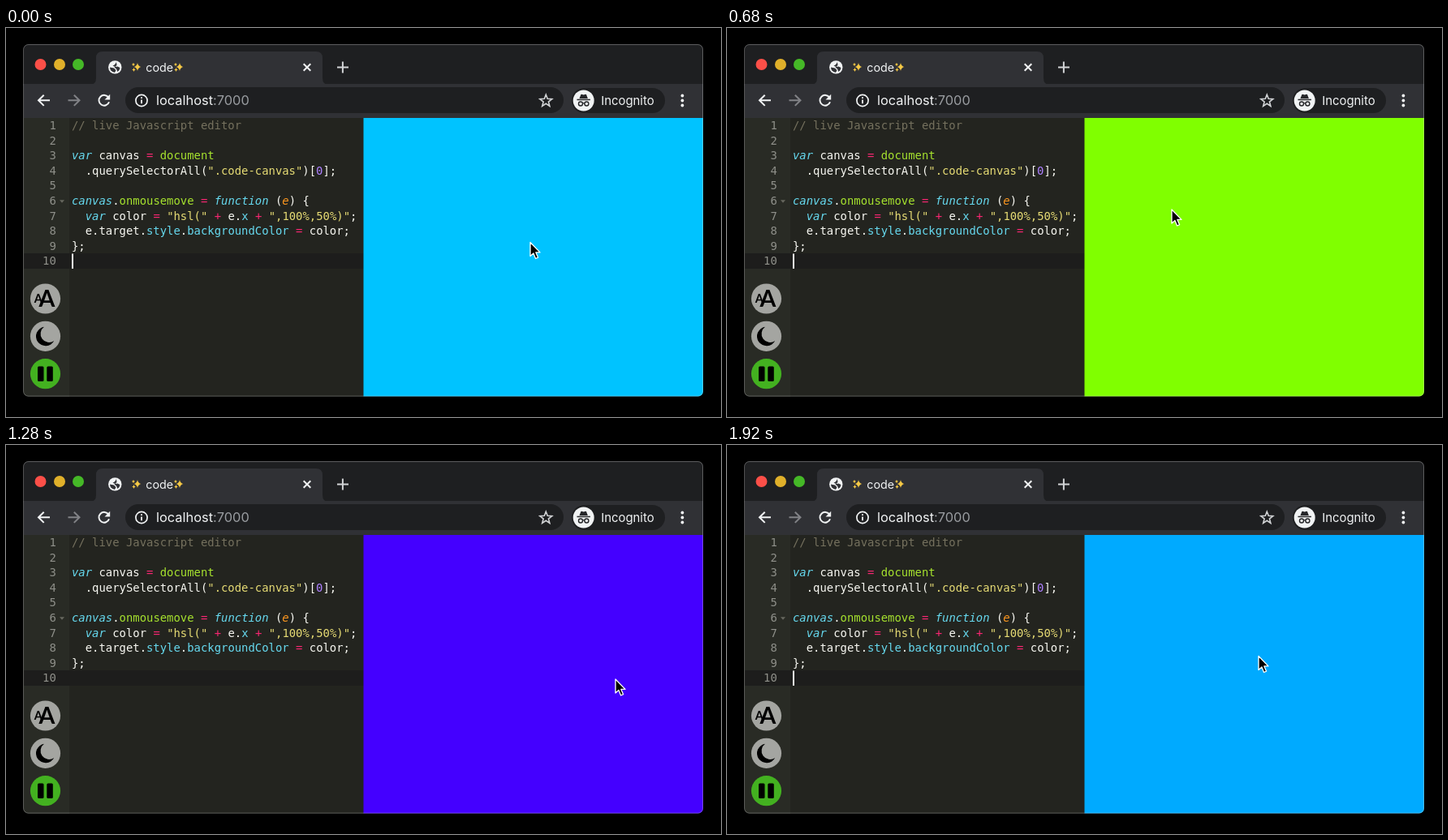
An HTML page for the animation above (1.96 s loop, 881 by 480 pixels).

```html
<!DOCTYPE html>
<html lang="en">
<head>
<meta charset="utf-8">
<title>Live editor</title>
<style>
  html, body { margin: 0; width: 100%; height: 100%; overflow: hidden; background: #000; }
  svg { display: block; position: absolute; left: 0; top: 0; }
  text { white-space: pre; }
  .ui { font-family: Inter, "Open Sans", sans-serif; fill: #f1f3f4; }
  .code { font: 13.9px "DejaVu Sans Mono", "Liberation Mono", monospace; fill: #f8f8f2; }
  .line { fill: none; stroke: #f1f3f4; stroke-width: 2; }
  .num { fill: #8f908a; text-anchor: end; }
  .c { fill: #75715e; }
  .k { fill: #66d9ef; font-style: italic; }
  .p { fill: #66d9ef; }
  .o { fill: #f92672; }
  .g { fill: #a6e22e; }
  .s { fill: #e6db74; }
  .n { fill: #ae81ff; }
  .a { fill: #fd971f; font-style: italic; }
</style>
</head>
<body>
<svg width="881" height="480" viewBox="0 0 881 480">
  <defs>
    <clipPath id="win"><rect x="21.5" y="20" width="837.5" height="434.5" rx="6"/></clipPath>
    <path id="spark" d="M0-5Q.8-.8 4.5 0Q.8.8 0 5Q-.8.8-4.5 0Q-.8-.8 0-5Z"/>
    <g id="sparkles" fill="#f6c945">
      <use href="#spark" x="1.5" y="0"/>
      <use href="#spark" transform="translate(-3.5 -3) scale(.45)"/>
      <use href="#spark" transform="translate(-3 3.5) scale(.5)"/>
    </g>
  </defs>

  <g clip-path="url(#win)">
    <rect x="21" y="20" width="839" height="51" fill="#1e1f21"/>
    <path d="M103 70Q111 70 111 62V37Q111 29 119 29H382Q390 29 390 37V62Q390 70 398 70Z" fill="#303135"/>
    <rect x="21" y="69" width="839" height="42" fill="#303135"/>
    <rect x="147" y="73" width="540" height="32" rx="16" fill="#1e1f21"/>
    <rect x="697" y="74" width="115" height="31" rx="15.5" fill="#1e1f21"/>

    <circle cx="42.5" cy="45" r="7" fill="#fc4f48"/>
    <circle cx="66" cy="45" r="7" fill="#e0b02a"/>
    <circle cx="89" cy="45" r="7" fill="#45b827"/>

    <circle cx="134.3" cy="48.4" r="8.2" fill="#f1f3f4"/>
    <path d="M128 48.5L133 49.5L135.5 52L134 55Q128 53.5 128 48.5ZM136 42Q134 46 131.5 46.5Q134 48.5 137.5 47.5L140.5 49Q140 52.5 137.5 54L136 50.5L133.5 48.5L136.5 46Z" fill="#303135"/>
    <use href="#sparkles" x="160.5" y="48"/>
    <use href="#sparkles" x="212.5" y="48"/>
    <text class="ui" x="172.3" y="53.6" font-size="14.3">code</text>
    <path class="line" d="M366.7 44.2L375.3 52.8M375.3 44.2L366.7 52.8"/>
    <path class="line" d="M408 48.5H422M414.9 41.5V55.5" style="stroke:#d2d4d6"/>

    <path class="line" d="M54 89.3H40.5M46.7 82.7L40 89.3L46.7 95.9"/>
    <path class="line" d="M76.5 89.3H90M83.8 82.7L90.5 89.3L83.8 95.9" style="stroke:#818286"/>
    <path class="line" d="M126.4 86A6.4 6.4 0 1 0 127 91.2"/>
    <path d="M128.2 81.8V88.5H121.5Z" fill="#f1f3f4"/>
    <circle class="line" cx="167" cy="89.5" r="7.1" style="stroke-width:1.7"/>
    <path class="line" d="M167 88.4V93.3M167 85.2V87" style="stroke-width:1.8"/>
    <text class="ui" x="185" y="95.1" font-size="16.4">localhost<tspan fill="#9a9da1">:7000</tspan></text>
    <path class="line" id="star" style="stroke-width:1.6;stroke:#d2d4d6"/>

    <circle cx="711.7" cy="89.5" r="13" fill="#f1f3f4"/>
    <g fill="#26272a">
      <path d="M706.5 87L708.3 82.3Q708.6 81.6 709.4 81.8L711.7 82.4L714 81.8Q714.8 81.6 715.1 82.3L716.9 87Z"/>
      <rect x="703.5" y="87.7" width="16.4" height="1.5"/>
    </g>
    <g fill="none" stroke="#26272a" stroke-width="1.4">
      <circle cx="708" cy="93.5" r="2.5"/><circle cx="715.4" cy="93.5" r="2.5"/>
      <path d="M710.4 93Q711.7 92.2 713 93"/>
    </g>
    <text class="ui" x="733.2" y="94.9" font-size="14.9">Incognito</text>
    <g fill="#f1f3f4">
      <circle cx="833.4" cy="83.5" r="1.9"/><circle cx="833.4" cy="89.5" r="1.9"/><circle cx="833.4" cy="95.5" r="1.9"/>
    </g>

    <rect x="21" y="111" width="420" height="344" fill="#23241f"/>
    <rect x="21" y="111" width="57" height="344" fill="#292b25"/>
    <rect x="21" y="278" width="420" height="19" fill="#1d1d1c"/>
    <path d="M66 212.3H72L69 215.8Z" fill="#67685f"/>
    <g id="code" class="code"></g>
    <rect id="caret" x="81" y="278.5" width="2" height="18.5" fill="#f8f8f0"/>

    <g fill="#a4a5a1">
      <circle cx="48.5" cy="334" r="18.6"/><circle cx="48.5" cy="380.3" r="18.6"/>
      <circle cx="48.5" cy="426.7" r="18.6" fill="#43b120"/>
    </g>
    <g font-family="Lato, 'Open Sans', sans-serif" font-weight="700">
      <text x="34.7" y="338.8" font-size="14.5">A</text>
      <text x="40.6" y="344" font-size="28.5">A</text>
    </g>
    <path d="M47 368.8A11.8 11.8 0 1 0 59.2 386A10.2 10.2 0 0 1 47 368.8Z"/>
    <rect x="39" y="417.5" width="7.5" height="18.5" rx="1.5"/>
    <rect x="50.3" y="417.5" width="7.5" height="18.5" rx="1.5"/>

    <rect id="pane" x="440.5" y="111" width="420" height="344"/>
  </g>
  <rect x="21.5" y="20.5" width="837" height="433.7" rx="6" fill="none" stroke="#fff" stroke-opacity=".28"/>
  <path id="mouse" d="M0 0V17L3.9 13.5L6.6 20L9.6 18.7L6.9 12.4H12Z" stroke="#fff" stroke-width="1.3" stroke-linejoin="round"/>
</svg>
<script>
const $ = id => document.getElementById(id);
const LOOP = 1960, TICK = 40;

// Each line is a list of "class|text" tokens; an empty class is plain text.
const lines = [
  ["c|// live Javascript editor"],
  [],
  ["k|var", "| canvas ", "o|=", "| ", "g|document"],
  ["|  .querySelectorAll(", 's|".code-canvas"', "|)[", "n|0", "|];"],
  [],
  ["k|canvas", "|.", "g|onmousemove", "| ", "o|=", "| ", "k|function", "| (", "a|e", "|) {"],
  ["|  ", "k|var", "| color ", "o|=", "| ", 's|"hsl("', "| ", "o|+", "| e.", "p|x", "| ", "o|+", "| ", 's|",100%,50%)"', "|;"],
  ["|  e.target.", "p|style", "|.", "p|backgroundColor", "| ", "o|=", "| color;"],
  ["|};"],
  []
];

function addText(x, y, cls, parent = $("code"), tag = "text") {
  const el = document.createElementNS("http://www.w3.org/2000/svg", tag);
  if (tag === "text") { el.setAttribute("x", x); el.setAttribute("y", y); }
  if (cls) el.setAttribute("class", cls);
  return parent.appendChild(el);
}

lines.forEach((tokens, i) => {
  const y = 125.2 + i * 18.56;
  addText(61.8, y, "num").textContent = i + 1;
  const row = addText(81, y);
  for (const token of tokens) {
    const cut = token.indexOf("|");
    addText(0, 0, token.slice(0, cut), row, "tspan").textContent = token.slice(cut + 1);
  }
});

const corners = Array.from({ length: 10 }, (_, i) => {
  const r = i % 2 ? 3.3 : 7.8, a = (i / 5 - 0.5) * Math.PI;
  return (665.3 + r * Math.cos(a)).toFixed(2) + " " + (90 + r * Math.sin(a)).toFixed(2);
});
$("star").setAttribute("d", "M" + corners.join("L") + "Z");

// time, pointer x, pointer y, hue
const path = [
  [0, 646, 264.5, 194],
  [200, 581, 284, 131],
  [400, 522.5, 270, 79],
  [520, 517, 243, 73],
  [680, 548, 224, 90],
  [960, 633, 261.5, 157],
  [1280, 751, 289, 256],
  [1480, 775, 262, 291],
  [1640, 755, 229.5, 280],
  [1920, 655, 260.5, 200]
];

const knot = i => {
  const n = path.length, turn = Math.floor(i / n), [t, ...v] = path[i - turn * n];
  return [t + turn * LOOP, ...v];
};

function slope(i, k) {
  const a = knot(i - 1), b = knot(i), c = knot(i + 1);
  const h = b[0] - a[0], g = c[0] - b[0];
  return ((b[k] - a[k]) / h * g + (c[k] - b[k]) / g * h) / (h + g);
}

// Closed cubic Hermite curve through the path
function sample(t, k) {
  let i = path.length - 1;
  while (path[i][0] > t) i--;
  const a = knot(i), b = knot(i + 1), h = b[0] - a[0], u = (t - a[0]) / h, w = 1 - u;
  return a[k] * (1 + 2 * u) * w * w + b[k] * u * u * (3 - 2 * u)
    + h * u * w * (slope(i, k) * w - slope(i + 1, k) * u);
}

function draw(now) {
  const t = Math.floor(now % LOOP / TICK) * TICK;
  $("mouse").setAttribute("transform", `translate(${sample(t, 1)} ${sample(t, 2)})`);
  $("pane").setAttribute("fill", `hsl(${Math.round(sample(t, 3))},100%,50%)`);
  $("caret").style.opacity = (t + 870) % 1000 < 500 ? 0 : 1;
}

const start = performance.now();
function frame() {
  draw(performance.now() - start);
  requestAnimationFrame(frame);
}
frame();
</script>
</body>
</html>
```
